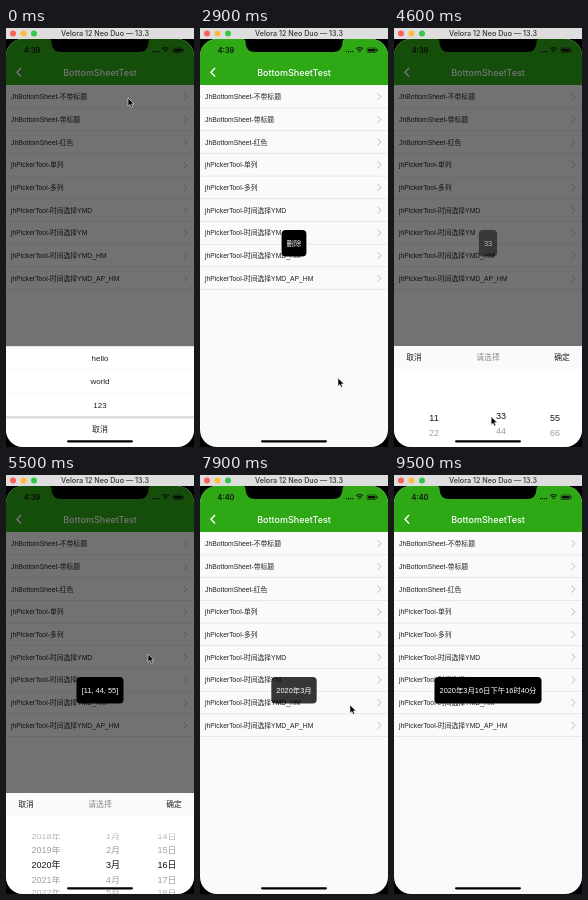
Animation of 188 by 419 pixels, one loop 9600 ms. Source, as an HTML page:

```html
<!DOCTYPE html>
<html lang="zh">
<head>
<meta charset="utf-8">
<title>BottomSheetTest</title>
<style>
  html, body { margin: 0; width: 100%; height: 100%; overflow: hidden; background: #000; }
  svg { display: block; width: 188px; height: 419px; }
  text { font-family: "Liberation Sans", "Noto Sans CJK SC", "Noto Sans CJK", sans-serif; white-space: pre; }
  .ui { font-family: Inter, "Noto Sans CJK SC", sans-serif; }
</style>
</head>
<body>
<svg viewBox="0 0 188 419">
  <defs>
    <clipPath id="screen"><rect y="11" width="188" height="408" rx="17"/></clipPath>
    <linearGradient id="fade" x2="0" y2="1">
      <stop offset="0" stop-color="#fff"/><stop offset="1" stop-color="#fff" stop-opacity="0"/>
    </linearGradient>
  </defs>
  <rect width="188" height="419"/>
  <g id="window"></g>
  <g clip-path="url(#screen)">
    <g id="page"></g>
    <rect id="dim" y="11" width="188" height="408"/>
    <g id="panel"></g>
    <g id="toast"></g>
    <rect x="61" y="412.2" width="66" height="2.3" rx="1.15"/>
  </g>
  <path d="M43 11H145Q142.500 11 142.500 14Q142.500 24 132.500 24H55.500Q45.500 24 45.500 14Q45.500 11 43 11Z"/>
  <path id="cursor" d="M0 0V8.200L1.900 6.500L3.200 9.300L4.600 8.700L3.400 5.900H6Z" stroke="#eee" stroke-width=".6"/>
</svg>
<script>
const LOOP = 9600, STEP = 100, ITEM = 23.6;
const $ = id => document.getElementById(id);
const clamp = v => Math.max(0, Math.min(1, v));
const rect = (x, y, w, h, fill, extra = '') =>
  `<rect x="${x}" y="${y}" width="${w}" height="${h}" fill="${fill}" ${extra}/>`;
const label = (s, x, y, size, fill = '#222', extra = 'text-anchor="middle"') =>
  `<text x="${x}" y="${y + size * .36}" font-size="${size}" fill="${fill}" ${extra}>${s}</text>`;
const stroke = (d, color, width) =>
  `<path d="${d}" fill="none" stroke="${color}" stroke-width="${width}"/>`;

const rows = ['JhBottomSheet-不带标题', 'JhBottomSheet-带标题', 'JhBottomSheet-红色',
  'jhPickerTool-单列', 'jhPickerTool-多列', 'jhPickerTool-时间选择YMD',
  'jhPickerTool-时间选择YM', 'jhPickerTool-时间选择YMD_HM', 'jhPickerTool-时间选择YMD_AP_HM'];

// Wheel columns: item(i) gives the text, roll goes from one index to another.
const list = (items, from, to = from) => ({ item: i => items[i], from, to });
const count = (value, unit) => ({ item: i => i > 0 ? i + unit : '', from: value, to: value });
const year = count(2020, '年'), month = count(3, '月'), day = count(16, '日');
const hour = count(16, '时'), minute = count(40, '分');

const panels = [
  { open: -400, close: 500, items: ['hello', 'world', '123'] },
  { open: 1180, close: 1800, title: '请选择', items: ['hello', 'world', '123'] },
  { open: 2180, close: 2580, title: '确定要删除吗?', items: ['删除'], red: true },
  { open: 3150, close: 3800, columns: [list(['11', '22', '33', '44'], 0, 2)] },
  { open: 4300, close: 4880, columns: [list(['11', '22'], 0),
    list(['33', '44'], 0, 1), list(['55', '66'], 0)] },
  { open: 5200, close: 6000, columns: [year, month, day] },
  { open: 6550, close: 7150, columns: [year, month] },
  { open: 7950, close: 8400, columns: [year, month, day, hour, minute] },
  { open: 8800, close: 9150, columns: [year, month, day, list(['上午', '下午'], 1), hour, minute] }
];

const toasts = [
  ['hello', 600, 1200], ['world', 1900, 2400], ['删除', 2700, 3400], ['33', 3850, 4700],
  ['[11, 44, 55]', 4980, 5850], ['2020年3月16日', 6100, 6900], ['2020年3月', 7250, 8056],
  ['2020年3月16日16时40分', 8500, 9050], ['2020年3月16日下午16时40分', 9250, 9900]
];

const moves = [[0, 122, 70], [100, 122, 70], [400, 108, 326], [600, 108, 326], [1100, 110, 91],
  [1400, 110, 91], [1700, 112, 350], [1850, 112, 350], [2100, 124, 114], [2250, 124, 114],
  [2500, 138, 372], [2700, 138, 372], [2900, 138, 350], [3100, 142, 137], [3250, 142, 137],
  [3400, 96, 398], [3600, 98, 376], [3780, 164, 327], [3900, 164, 325], [4000, 164, 311],
  [4200, 142, 159], [4350, 142, 159], [4500, 96, 398], [4680, 98, 382], [4820, 166, 327],
  [4950, 166, 327], [5150, 142, 179], [5500, 142, 179], [5850, 166, 328], [6050, 166, 328],
  [6450, 146, 205], [6650, 146, 205], [7000, 166, 328], [7250, 166, 328], [7750, 150, 230],
  [8050, 150, 230], [8300, 166, 328], [8450, 166, 328], [8700, 150, 250], [8900, 150, 250],
  [9100, 168, 328], [9250, 168, 328], [9450, 200, 335], [9600, 200, 335]];

const battery = rect(167, 20, 9.500, 4.500, 'none', 'rx="1.3" stroke="#111" stroke-width=".6"')
  + rect(168, 21, 7.500, 2.500, '#111', 'rx=".5"') + rect(177, 21.500, .8, 1.500, '#111');
const wifi = [1.4, 3, 4.600].map(r =>
  stroke(`M${159.500 - r * .75} ${25 - r}Q159.500 ${24.500 - r * 1.3} ${159.500 + r * .75} ${25 - r}`, '#111', 1)).join('');
const signal = [0, 1, 2, 3].map(i => rect(146 + i * 2, 23, 1.1, 1.2, '#111')).join('');

$('window').innerHTML = rect(0, 0, 188, 11, '#dedede')
  + [['#fc605b', 7], ['#fdbc40', 17.500], ['#34c84a', 28]]
    .map(([color, x]) => `<circle cx="${x}" cy="5.500" r="3" fill="${color}"/>`).join('')
  + label('Velora 12 Neo Duo — 13.3', 99, 5.500, 7.200, '#333', 'text-anchor="middle" class="ui" font-weight="500"');

$('page').innerHTML = rect(0, 11, 188, 408, '#fafafa') + rect(0, 11, 188, 46, '#2ea815')
  + label('', 26, 22, 7.300, '#111', 'id="clock" class="ui" text-anchor="middle" font-weight="600"')
  + signal + wifi + battery
  + stroke('M15 40L11 44.300L15 48.600', '#fff', 1.4)
  + label('BottomSheetTest', 94, 44.300, 9, '#fff', 'text-anchor="middle" class="ui" font-weight="500"')
  + rows.map((name, i) => {
    const y = 68.700 + i * 22.700;
    return label(name, 5, y, 6.800, '#222', '') + rect(0, y + 11, 188, .5, '#d4d4d4')
      + stroke(`M177.500 ${y - 3.500}L181 ${y}L177.500 ${y + 3.500}`, '#b4b4b4', .9);
  }).join('');

function sheet({ title, items, red }) {
  const lines = title ? [title, ...items] : items;
  const top = 389 - lines.length * ITEM + (title ? 0.6 : 0);
  let out = rect(0, top, 188, 430 - top, '#fff');
  lines.forEach((line, i) => {
    const y = 377 - (lines.length - 1 - i) * ITEM, heading = title && !i;
    out += label(line, 94, y + (heading ? 1 : 0), heading ? 6 : 8, heading ? '#888' : red ? '#f22' : '#222');
    if (i) out += rect(0, y - 11.800, 188, .4, '#eee');
  });
  out += rect(0, 388, 188, 2.500, '#ddd') + label('取消', 94, 401, 8);
  return { out, height: 419 - top };
}

function wheel(column, x, size, turn) {
  const at = column.from + (column.to - column.from) * turn;
  let out = '';
  for (let i = Math.round(at) - 2; i <= Math.round(at) + 2; i++) {
    const angle = (i - at) * .34, far = Math.abs(i - at);
    const text = column.item(i);
    if (!text || far > 2.600) continue;
    const y = 389.500 + 45 * Math.sin(angle), shade = far < .5 ? 17 : 145 + far * 14;
    out += `<g transform="translate(${x} ${y}) scale(1 ${Math.cos(angle)})">`
      + label(text, 0, 0, size, `rgb(${shade},${shade},${shade})`) + '</g>';
  }
  return out;
}

function picker({ columns, open, close }, t) {
  const n = columns.length, turn = clamp((t - open - 250) / 250);
  const size = n > 4 ? 7 : 9, eased = turn * turn * (3 - 2 * turn);
  const spots = n === 3 ? [40, 107, 161] : columns.map((_, i) => 188 * (i + .5) / n);
  let out = rect(0, 318, 188, 112, '#fff');
  out += columns.map((column, i) => wheel(column, spots[i], size, eased)).join('');
  out += rect(0, 341, 188, 24, 'url(#fade)') + rect(0, 318, 188, 23, '#fafafa');
  if (t >= close - 50) out += rect(148, 319, 40, 20, '#dedede');
  out += label('取消', 20, 329.500, 7.800) + label('请选择', 94, 329.500, 7.800, '#888')
    + label('确定', 168, 329.500, 7.800);
  return { out, height: 101 };
}

function drawPanel(t) {
  const panel = panels.find(p => t >= p.open && t < p.close + 300);
  let shown = 0, content = '';
  if (panel) {
    shown = t < panel.close ? 1 - (1 - clamp((t - panel.open) / 300)) ** 3
      : 1 - ((t - panel.close) / 300) ** 3;
    const { out, height } = panel.columns ? picker(panel, t) : sheet(panel);
    content = `<g transform="translate(0 ${(1 - shown) * height})">${out}</g>`;
  }
  $('panel').innerHTML = content;
  $('dim').setAttribute('opacity', .54 * Math.min(1, shown * 1.3));
}

function drawToast(t) {
  const toast = toasts.find(([, start, end]) => t >= start && t < end);
  if (!toast) return void ($('toast').innerHTML = '');
  const [text, start, end] = toast, size = 7.400;
  const width = [...text].reduce((w, c) => w + (c > '\u2e80' ? 1 : /[\d\w]/.test(c) ? .556 : .278), 0) * size + 10;
  const alpha = Math.min(clamp((t - start + 50) / 100), clamp((end - t) / 200));
  $('toast').innerHTML = `<g opacity="${alpha}">` + rect(94 - width / 2, 202, width, 26.500, '#000', 'rx="4"')
    + label(text, 94, 215.300, size, '#fff') + '</g>';
}

function drawCursor(t) {
  const next = Math.max(1, moves.findIndex(m => m[0] > t));
  const [t0, x0, y0] = moves[next - 1], [t1, x1, y1] = moves[next];
  const u = (t - t0) / (t1 - t0), e = u * u * (3 - 2 * u);
  $('cursor').setAttribute('transform', `translate(${x0 + (x1 - x0) * e} ${y0 + (y1 - y0) * e})`);
}

const begin = performance.now();
function frame() {
  const t = Math.floor((performance.now() - begin) % LOOP / STEP) * STEP;
  $('clock').textContent = t < 6500 ? '4:39' : '4:40';
  drawPanel(t);
  drawToast(t);
  drawCursor(t);
  requestAnimationFrame(frame);
}
frame();
</script>
</body>
</html>
```
